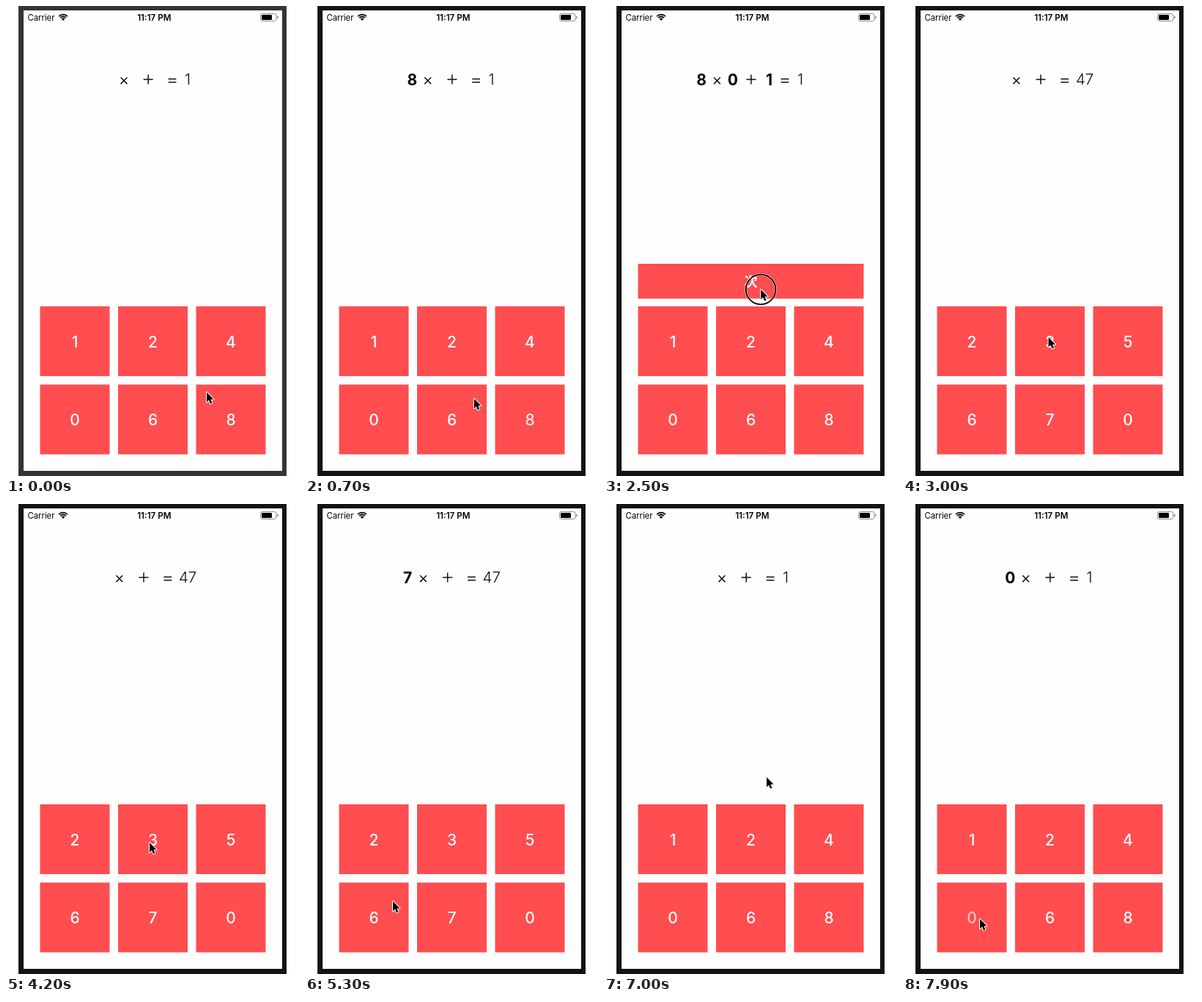
An HTML page with a canvas that plays this animation: 400 by 640 pixels, repeating every 8000 ms.

```html
<!DOCTYPE html>
<html lang="en">
<head>
<meta charset="utf-8">
<title>Sum puzzle</title>
<style>
  html, body { margin: 0; width: 100%; height: 100%; overflow: hidden; background: #fff; }
  canvas { display: block; width: 400px; height: 640px; }
</style>
</head>
<body>
<canvas id="stage"></canvas>
<script>
const W = 400, H = 640, LOOP = 8000;
const canvas = document.getElementById('stage');
const ctx = canvas.getContext('2d');
const ratio = window.devicePixelRatio || 1;
canvas.width = W * ratio;
canvas.height = H * ratio;

const RED = '#ff4d50';
const SANS = 'Inter, Roboto, sans-serif';
const HOLD = 200;   // time between press and release
const DIGIT = 13.3; // width one filled slot adds to the sum

const rounds = [
  { start: 0, keys: '124068', result: '1' },
  { start: 2700, keys: '235670', result: '47' },
  { start: 6600, keys: '124068', result: '1' }
];

// key -1 is the wide "next" button
const presses = [
  { t: 300, key: 5 }, { t: 1200, key: 3 }, { t: 1900, key: 0 }, { t: 2500, key: -1 },
  { t: 4600, key: 4 }, { t: 5400, key: 3 }, { t: 5900, key: 2 }, { t: 6400, key: -1 },
  { t: 7700, key: 3 }
];

// pointer path: time, x, y
const path = [
  [0, 274, 526], [500, 274, 526], [1100, 109, 559], [1400, 109, 559],
  [1750, 109, 453], [2100, 109, 453], [2450, 214, 386], [2600, 214, 386],
  [2700, 213, 397], [3100, 196, 461], [4200, 196, 461], [4550, 203, 548],
  [4850, 203, 548], [5250, 120, 541], [5600, 120, 541], [5880, 292, 461],
  [6100, 292, 461], [6380, 222, 372], [7250, 222, 372], [7680, 105, 562],
  [7800, 105, 562], [7900, 105, 565], [8000, 105, 565]
];

const clamp = v => Math.max(0, Math.min(1, v));
const ease = v => v * v * (3 - 2 * v);

function pointerAt(t) {
  let i = 1;
  while (i < path.length - 1 && path[i][0] <= t) i++;
  const [t0, x0, y0] = path[i - 1], [t1, x1, y1] = path[i];
  const k = ease(clamp((t - t0) / (t1 - t0)));
  return [x0 + (x1 - x0) * k, y0 + (y1 - y0) * k];
}

function roundAt(t) {
  let i = rounds.length - 1;
  while (rounds[i].start > t) i--;
  return i;
}

function text(str, x, y, font, color, align = 'center') {
  ctx.font = font;
  ctx.fillStyle = color;
  ctx.textAlign = align;
  ctx.fillText(str, x, y);
}

function rect(x, y, w, h, color) {
  ctx.fillStyle = color;
  ctx.fillRect(x, y, w, h);
}

function line(x0, y0, x1, y1) {
  ctx.beginPath();
  ctx.moveTo(x0, y0);
  ctx.lineTo(x1, y1);
  ctx.stroke();
}

function drawPhone(t) {
  rect(0, 0, W, H, '#fff');
  rect(17, 0, 366, H, t < 100 ? '#343434' : '#131313');
  rect(24, 6, 353, 627, '#fefefe');
}

function drawStatus() {
  text('Carrier', 29.5, 20, '400 11.3px ' + SANS, '#000', 'left');
  text('11:17 PM', 202.3, 20, '600 11.6px ' + SANS, '#000');

  const cx = 78, cy = 20, a = Math.PI / 4;
  ctx.strokeStyle = ctx.fillStyle = '#000';
  ctx.lineWidth = 1.8;
  for (const r of [8.4, 5.5]) {
    ctx.beginPath();
    ctx.arc(cx, cy, r, -Math.PI / 2 - a, -Math.PI / 2 + a);
    ctx.stroke();
  }
  ctx.beginPath();
  ctx.moveTo(cx, cy);
  ctx.arc(cx, cy, 3.4, -Math.PI / 2 - a, -Math.PI / 2 + a);
  ctx.fill();

  ctx.strokeStyle = '#8c8c8c';
  ctx.lineWidth = 1;
  ctx.beginPath();
  ctx.roundRect(347.5, 10.5, 21.5, 10, 2.6);
  ctx.stroke();
  ctx.fillStyle = '#000';
  ctx.beginPath();
  ctx.roundRect(349, 12, 14, 7, 1.2);
  ctx.fill();
  ctx.fillStyle = '#8c8c8c';
  ctx.beginPath();
  ctx.roundRect(370.2, 13.8, 1.5, 3.4, 0.7);
  ctx.fill();
}

function drawSum(slots, result) {
  const n = slots.length;
  const left = (result.length > 1 ? 154.8 : 161) - n * DIGIT / 2;
  const after = i => Math.min(n, i) * DIGIT;
  const times = left + after(1);
  const plus = left + 33.2 + after(2);
  const equal = left + 66 + after(3);

  ctx.strokeStyle = '#111';
  ctx.lineWidth = 1.5;
  line(times - 4.4, 97.3, times + 4.4, 106.1);
  line(times - 4.4, 106.1, times + 4.4, 97.3);
  line(plus - 6.5, 100, plus + 6.5, 100);
  line(plus, 93.5, plus, 106.5);
  line(equal - 5.4, 99.4, equal + 5.4, 99.4);
  line(equal - 5.4, 103.8, equal + 5.4, 103.8);

  const places = [times - 21.3, plus - 25, equal - 21.5];
  slots.forEach((d, i) => text(d, places[i], 107.6, '700 21px ' + SANS, '#000'));
  const x = equal + (result.length > 1 ? 27.3 : 21);
  text(result, x, 107.3, '300 20.5px ' + SANS, '#111');
}

// title opacity of a key: dims while held, then recovers
function brightness(key, t) {
  let b = 1;
  for (const p of presses) {
    const dt = t - p.t;
    if (p.key !== key || dt < 100) continue;
    b = Math.min(b, 0.65 + 0.35 * clamp((dt - HOLD) / 300));
  }
  return b;
}

function drawKeys(t, index) {
  const { start, keys } = rounds[index];
  const mix = index ? clamp((t - start) / 200) : 1;
  const font = '500 21px ' + SANS;
  for (let i = 0; i < 6; i++) {
    const x = 46.5 + (i % 3) * 106.5, y = 409 + Math.floor(i / 3) * 106.5;
    rect(x, y, 95, 95, RED);
    const b = brightness(i, t), cx = x + 47.5, cy = y + 55.5;
    ctx.globalAlpha = b * mix;
    text(keys[i], cx, cy, font, '#fff');
    if (mix < 1) {
      ctx.globalAlpha = b * (1 - mix);
      text(rounds[index - 1].keys[i], cx, cy, font, '#fff');
    }
    ctx.globalAlpha = 1;
  }
}

function drawNext(t) {
  rect(46.5, 351, 308, 47.5, RED);
  ctx.globalAlpha = brightness(-1, t);
  text('次', 200.5, 381.5, '700 18px "Noto Sans CJK JP", "Noto Sans CJK", sans-serif', '#fff');
  ctx.globalAlpha = 1;
}

function drawPointer(t) {
  const [x, y] = pointerAt(t);
  if (presses.some(p => t >= p.t && t < p.t + HOLD)) {
    for (const [width, color] of [[3.2, 'rgba(255,255,255,.6)'], [1.7, '#000']]) {
      ctx.lineWidth = width;
      ctx.strokeStyle = color;
      ctx.beginPath();
      ctx.arc(x, y, 20.3, 0, Math.PI * 2);
      ctx.stroke();
    }
  }
  const shape = [[0, 0], [0, 13.4], [3, 10.6], [5, 15.4], [7.4, 14.4], [5.4, 9.7], [9.4, 9.5]];
  ctx.beginPath();
  for (const [dx, dy] of shape) ctx.lineTo(x + dx, y + dy);
  ctx.closePath();
  ctx.lineJoin = 'round';
  ctx.lineWidth = 2;
  ctx.strokeStyle = '#fff';
  ctx.stroke();
  ctx.fillStyle = '#000';
  ctx.fill();
}

function draw(t) {
  ctx.setTransform(ratio, 0, 0, ratio, 0, 0);
  const index = roundAt(t);
  const { start, keys, result } = rounds[index];
  const slots = presses
    .filter(p => p.key >= 0 && p.t >= start && t >= p.t + HOLD)
    .map(p => keys[p.key]);
  drawPhone(t);
  drawStatus();
  drawSum(slots, result);
  drawKeys(t, index);
  if (slots.length === 3) drawNext(t);
  drawPointer(t);
}

const begin = performance.now();
function frame() {
  draw((performance.now() - begin) % LOOP);
  requestAnimationFrame(frame);
}
frame();
</script>
</body>
</html>
```
